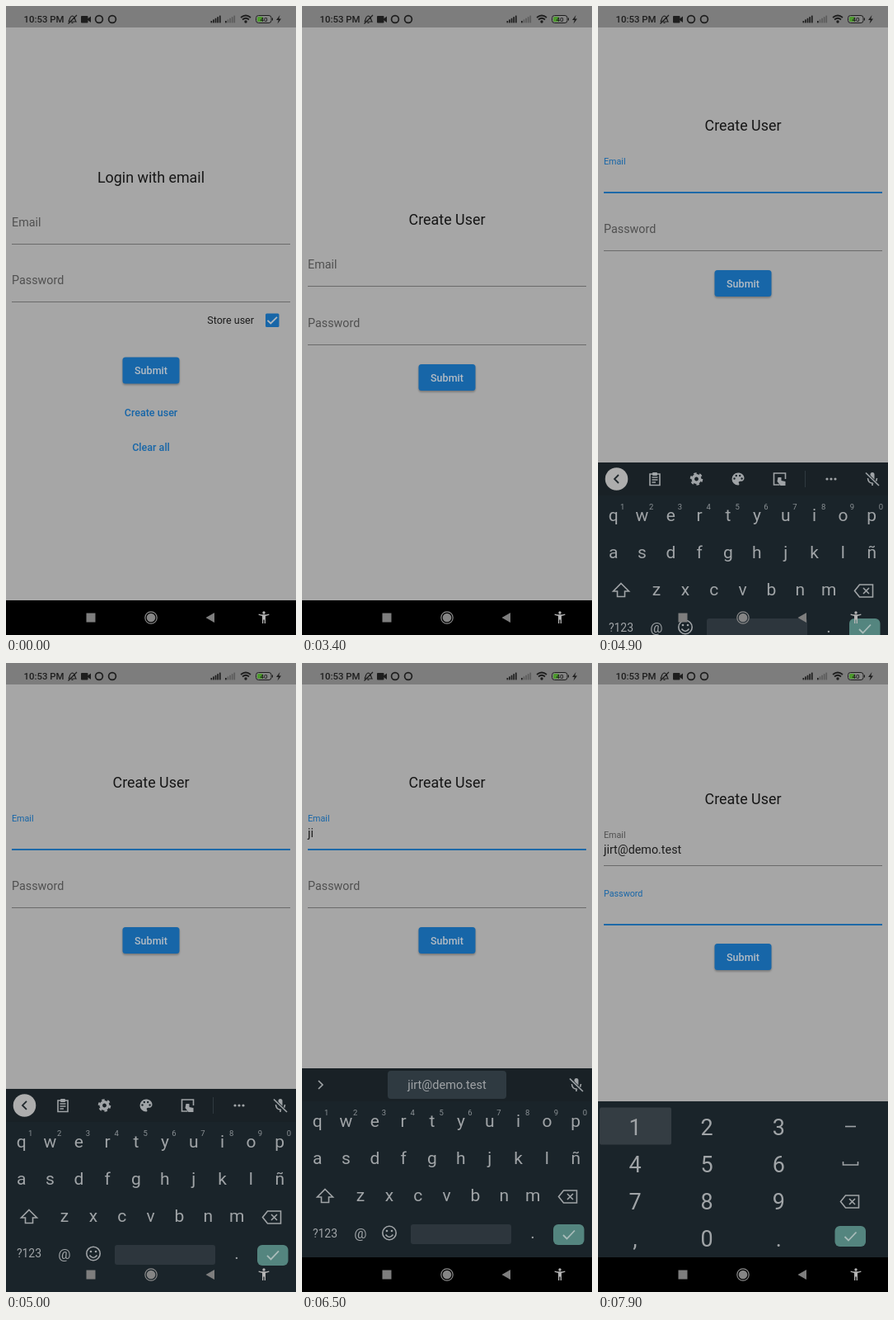
Write an HTML page that moves like this. It is 352 px wide and 762 px high and loops after 8 s.

```html
<!DOCTYPE html>
<html lang="en">
<head>
<meta charset="utf-8">
<title>Create user</title>
<style>
  html, body { margin: 0; width: 100%; height: 100%; overflow: hidden; background: #a6a6a6; }
  svg { display: block; width: 352px; height: 762px; font-family: Roboto, sans-serif; }
  .mid { text-anchor: middle; }
  .title { font-size: 17.9px; fill: #161616; }
  .body { font-size: 14.33px; fill: #1c1c1c; }
  .small { font-size: 12.54px; fill: #1c1c1c; }
  .action { font-size: 12.54px; font-weight: 500; fill: #1766a8; }
  .line { fill: none; stroke: #a0a4a7; stroke-width: 1.6; }
  .key { font-size: 21px; fill: #a0a4a7; text-anchor: middle; }
  .hint { font-size: 9.5px; fill: #8b9195; text-anchor: middle; }
  .digit { font-size: 27px; fill: #a0a4a7; text-anchor: middle; }
</style>
</head>
<body>
<svg id="stage" viewBox="0 0 352 762"></svg>
<script>
const BLUE = '#1766a8', GRAY = '#505050', KEYBOARD = '#1a242a', LIGHT = '#a0a4a7';
const EMAIL = 'jirt@demo.test';

const rect = (x, y, w, h, fill, r = 0, extra = '') =>
  `<rect x="${x}" y="${y}" width="${w}" height="${h}" rx="${r}" fill="${fill}" ${extra}/>`;
const text = (x, y, cls, s, extra = '') => `<text x="${x}" y="${y}" class="${cls}" ${extra}>${s}</text>`;
const path = (d, extra = 'class="line"') => `<path d="${d}" ${extra}/>`;
const dot = (x, y, r, fill) => `<circle cx="${x}" cy="${y}" r="${r}" fill="${fill}"/>`;
const ring = (x, y, r, color, w) =>
  `<circle cx="${x}" cy="${y}" r="${r}" fill="none" stroke="${color}" stroke-width="${w}"/>`;
const at = (x, y, content) => `<g transform="translate(${x} ${y})">${content}</g>`;
const group = (id, content) => `<g id="${id}">${content}</g>`;

const button = y => rect(141.5, y + 1.3, 69, 32.5, '#000', 3.5, 'opacity=".28" filter="url(#soft)"') +
  rect(141.5, y, 69, 32, BLUE, 3.5) +
  text(176, y + 20.6, 'action mid', 'Submit', 'style="fill:#b4bcc4"');

const field = (id, label, line) =>
  rect(7, line - 1, 338, 1, '#6a6a6a') +
  rect(7, line - 1, 338, 1.9, BLUE, 0, `id="${id}Bar" opacity="0"`) +
  text(0, 0, 'body', label, `id="${id}Label" transform="translate(7 ${line - 22})" style="fill:${GRAY}"`);

function statusBar() {
  const ink = '#1e1e1e';
  const signal = (x, strong) => [0, 1, 2, 3, 4].map(i =>
    rect(x + i * 2.6, 18 - i * 1.6, 1.7, 2.4 + i * 1.6, i < strong ? ink : '#5c5c5c')).join('');
  const stroke = `fill="none" stroke="${ink}" stroke-width="1.2"`;
  return rect(0, 0, 352, 26, '#7d7d7d') +
    text(21.5, 20.2, '', '10:53 PM', `font-size="11.4" font-weight="500" fill="${ink}"`) +
    path('M76 19H85C83.500 17 84 12.500 80.500 12 77 12.500 77.500 17 76 19M79.500 20.500H81.500M75.500 21.500 86 11', stroke) +
    rect(91, 12, 8.5, 8.5, ink, 1) + path('M99 15.500 103 12.500V20L99 17Z', `fill="${ink}"`) +
    ring(113, 16, 4.4, ink, 1.7) + ring(129, 16, 4.4, ink, 1.7) +
    signal(248.5, 5) + signal(266, 1) +
    path('M285 14Q291 9 297 14M287 16.500Q291 13 295 16.500', `fill="none" stroke="${ink}" stroke-width="1.7"`) +
    dot(291, 19, 1.7, ink) +
    rect(303.5, 11.5, 18.5, 9, '#858585', 3, `stroke="${ink}"`) + rect(305, 13, 7, 6, '#4d9a2e', 1.5) +
    rect(322.8, 14.5, 1.2, 3, ink) +
    text(313, 19, 'mid', '40', `font-size="8" font-weight="500" fill="${ink}"`) +
    path('M332.500 11 328 17H330.800L329.500 21.500 334 15.500H331.200Z', `fill="${ink}"`);
}

function navBar() {
  const person = path('M306.500 737.800 311 739V748H312.300V743.500H313.700V748H315V739L319.500 737.800 319.200 736.500Q313 738.200 306.800 736.500Z',
    'fill="#b5b5b5"');
  return rect(0, 720, 352, 42, '#000', 0, 'id="navBack"') +
    rect(97.5, 735.5, 11, 11, '#7e7e7e') +
    ring(176, 741, 7.2, '#8a8a8a', 1.2) + dot(176, 741, 5.3, '#858585') +
    path('M253 735V747L242.500 741Z', 'fill="#7e7e7e"') +
    dot(313, 735, 1.7, '#b5b5b5') + person;
}

const loginPage = () =>
  text(176, 214, 'title mid', 'Login with email') +
  field('loginEmail', 'Email', 289) + field('loginPass', 'Password', 359) +
  text(301, 385.3, 'small', 'Store user', 'text-anchor="end"') +
  rect(315, 372.5, 16.5, 16.5, BLUE, 1.5) +
  path('M317.500 380.800 321.300 384.500 329 376.800', 'fill="none" stroke="#b0b8bf" stroke-width="1.8"') +
  button(425.5) +
  text(176, 496.5, 'action mid', 'Create user') + text(176, 539.4, 'action mid', 'Clear all');

const createPage = () =>
  text(176, 151.3, 'title mid', 'Create User') +
  field('email', 'Email', 226) + text(7, 211, 'body', '', 'id="typed"') +
  field('pass', 'Password', 297) +
  rect(0, 0, 1.8, 14, BLUE, 0, 'id="cursor"') + button(320);

const backspace = at => path('M-11.500 0-5.500-7.500H10.500V7.500H-5.500ZM-1-3.500 6 3.500M6-3.500-1 3.500');
const enter = (x, y) => rect(x, y, 37.5, 25, '#54857f', 6) +
  path(`M${x + 12} ${y + 13}l4.500 4.500 9.500-10`, 'fill="none" stroke="#a9bcba" stroke-width="1.800"');

const toolbar = () =>
  dot(22.5, 511, 13.8, '#adadad') + path('M25 506 20 511 25 516', 'fill="none" stroke="#20282d" stroke-width="1.800"') +
  at(69, 511, path('M-6-6H6V7.500H-6ZM-3.500-2H3.500M-3.500 1H3.500M-3.500 4H1') + rect(-3, -8, 6, 4, LIGHT, 1)) +
  at(119.5, 511, ring(0, 0, 4.2, LIGHT, 3.6) +
    `<circle r="6.7" fill="none" stroke="${LIGHT}" stroke-width="2.2" stroke-dasharray="3.5 3.516"/>`) +
  at(170, 511, path('M0-7.500A7.500 7.500 0 0 0 0 7.500C2 7.500 1.500 6 1 5 0 3 2 2.700 4 2.700 6 2.700 7.500 1 7.500-1 7.500-5 4-7.500 0-7.500Z',
    `fill="${LIGHT}"`) + [[-4.5, -.5], [-2.2, -4], [2.2, -4], [4.6, -.5]].map(p => dot(...p, 1.2, KEYBOARD)).join('')) +
  at(220.5, 511, path('M0 7H-7V-7H7V0') + path('M-2-2H2V2L7 3V8H1L-3 3Z', `fill="${LIGHT}"`)) +
  rect(251, 501, 1, 20, '#303a40') +
  [278, 283, 288].map(x => dot(x, 511, 1.6, LIGHT)).join('');

const suggestions = () =>
  path('M20 506 25 511 20 516') + rect(104, 494, 144, 34, '#2f3a41', 4, 'id="picked"') +
  text(176, 516, 'mid', EMAIL, `font-size="14.5" fill="${LIGHT}"`);

function letterKeys() {
  const pitch = 34.85;
  const row = (chars, x, y) => [...chars].map((c, i) => text(x + i * pitch, y, 'key', c)).join('');
  return rect(0, 491, 352, 300, KEYBOARD) + rect(0, 491, 352, 40, '#192126') +
    group('toolbar', toolbar()) + group('suggestions', suggestions()) +
    at(333, 511, rect(-2.5, -8, 5, 10, LIGHT, 2.5) + path('M-5.500-1Q-5 5 0 5 5 5 5.500-1M0 5V8') +
      path('M-8-7 7 8', `stroke="${KEYBOARD}" stroke-width="4"`) + path('M-8-7.500 8 8')) +
    row('qwertyuiop', 18.6, 562) + row('asdfghjklñ', 18.6, 607) + row('zxcvbnm', 71, 652) +
    [...'1234567890'].map((c, i) => text(29.7 + i * pitch, 548, 'hint', c)).join('') +
    at(28, 646, path('M0-8.500 9.500 1H4.500V7.500H-4.500V1H-9.500Z')) + at(323, 646.5, backspace()) +
    text(28, 695.5, 'key', '?123', 'style="font-size:14px"') + text(71, 697, 'key', '@', 'style="font-size:17px"') +
    ring(106, 690.5, 8.2, LIGHT, 1.6) + dot(103, 688, 1.3, LIGHT) + dot(109, 688, 1.3, LIGHT) +
    path('M101.500 692.500Q106 698.500 110.500 692.500') +
    rect(132, 680, 122, 24, '#2d363d', 3) + text(280, 697, 'key', '.') + enter(305, 680) +
    rect(305, 680, 37.5, 25, '#fff', 6, 'id="enterPress" opacity=".15"') +
    group('popup', rect(210.5, 520, 34.5, 99.5, '#2a343a', 4) + text(228, 553, 'key', 'j', 'style="font-size:26px"'));
}

const numberKeys = () => rect(0, 531, 352, 189, KEYBOARD) +
  rect(2, 538.5, 87, 45, '#343d43', 2, 'id="onePress"') +
  ['123', '456', '789', ',0.'].map((chars, r) => [...chars].map((c, i) =>
    text(45 + i * 87.2, 571.5 + r * 45.3, 'digit', c)).join('')).join('') +
  path('M300 561.500H313') + path('M297.500 604V608H315.500V604') +
  at(306, 652.5, backspace()) + enter(287.500, 682);

document.getElementById('stage').innerHTML =
  '<defs><filter id="soft"><feGaussianBlur stdDeviation="1"/></filter></defs>' +
  rect(0, 0, 352, 762, '#a6a6a6') + statusBar() +
  group('login', loginPage()) + group('create', createPage()) +
  group('letters', letterKeys()) + group('numbers', numberKeys()) + navBar();

const $ = id => document.getElementById(id);
const show = (id, on) => $(id).style.display = on ? '' : 'none';
const between = (t, a, b) => t >= a && t < b;
const ramp = (t, start) => {
  const p = Math.min(1, Math.max(0, (t - start) / 200));
  return p * p * (3 - 2 * p);
};

function setField(id, line, lift, focus) {
  $(id + 'Label').setAttribute('transform', `translate(7 ${line - 22 - 12 * lift}) scale(${1 - lift / 4})`);
  $(id + 'Label').style.fill = `color-mix(in srgb, ${BLUE} ${focus * 100}%, ${GRAY})`;
  $(id + 'Bar').setAttribute('opacity', focus);
}

function render(t) {
  show('login', t < 3400);
  show('create', t >= 3400);
  $('create').setAttribute('transform', `translate(0 ${t < 4900 ? 114 : t < 7200 ? 0 : 20})`);

  const emailOn = ramp(t, 4220), passOn = ramp(t, 7100);
  setField('email', 226, emailOn, emailOn - passOn);
  setField('pass', 297, passOn, passOn);

  const typed = t < 5600 ? '' : t < 5800 ? EMAIL[0] : t < 6600 ? EMAIL.slice(0, 2) : EMAIL;
  $('typed').textContent = typed;
  const inPass = t >= 7100;
  $('cursor').setAttribute('x', 7 + (inPass || !typed ? 0 : $('typed').getComputedTextLength()));
  $('cursor').setAttribute('y', inPass ? 270 : 199);
  show('cursor', between(t, 4400, 4900) || between(t, 5300, 6300) || between(t, 6600, 7600));

  const slide = t < 5300 ? 62 * Math.exp((4900 - t) / 110) : 0;
  const sliding = between(t, 4900, 5300);
  show('letters', between(t, 4900, 7100));
  $('letters').setAttribute('transform', `translate(0 ${slide})`);
  show('navBack', !sliding);
  show('popup', between(t, 5500, 5700));
  const suggesting = between(t, 5700, 6600);
  show('suggestions', suggesting);
  show('toolbar', !suggesting);
  show('picked', t >= 6500);
  show('enterPress', t >= 6900);

  show('numbers', t >= 7100);
  show('onePress', t >= 7900);
}

function tick(now) {
  render(Math.floor(now / 100) * 100 % 8000);
  requestAnimationFrame(tick);
}
tick(performance.now());
</script>
</body>
</html>
```
